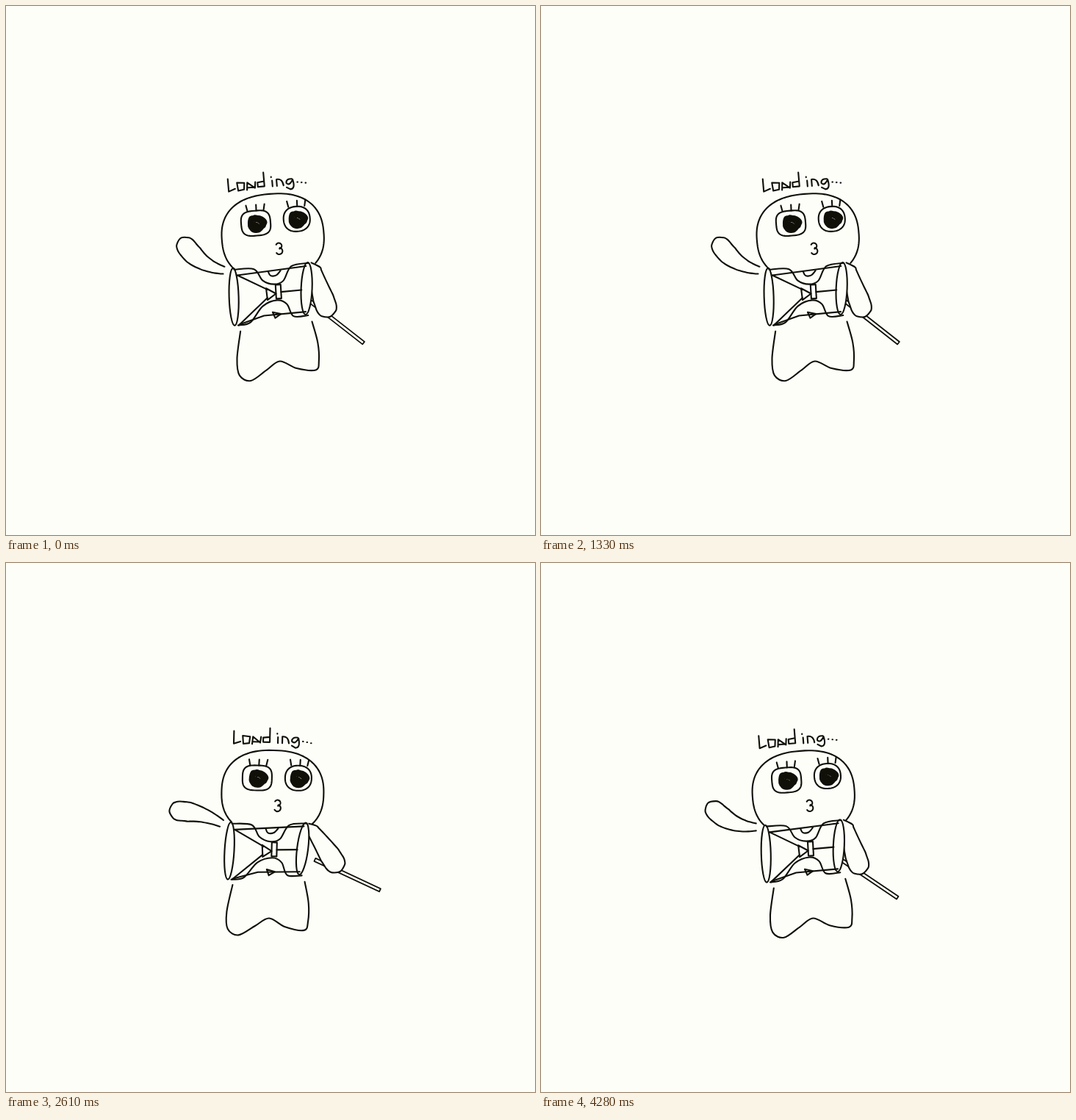
Recreate the animation shown at these times as an HTML page with a canvas. Size 720x720 px, loop 4340 ms.

```html
<!DOCTYPE html>
<html lang="en">
<head>
<meta charset="utf-8">
<title>Loading...</title>
<style>
html, body { margin: 0; width: 100%; height: 100%; overflow: hidden; background: #fefef9; }
canvas { display: block; }
</style>
</head>
<body>
<canvas id="stage" width="720" height="720"></canvas>
<script>
const ctx = document.getElementById('stage').getContext('2d');
const PAPER = '#fefef9', INK = '#101008';
const LOOP = 4340, STEP = 1000 / 18, LAST = 77, RAD = Math.PI / 180;

// Angles in degrees; "left" and "right" aim the hands, "curl" bends the left elbow
const down = { lean: -4, slide: 2, left: 217, curl: -26, right: 72, wand: 38 };
const rest = { lean: -3.7, slide: -4, left: 207, curl: -27, right: 72, wand: 34 };
const low = { lean: 2.6, slide: 3, left: 197, curl: -10, right: 70, wand: 54 };
const drop = { lean: 1.8, slide: 0, left: 193, curl: 16, right: 56, wand: 25 };
const lift = { lean: 0, slide: 0, left: 192, curl: -6, right: 37, wand: 35 };
const fall = { lean: -1.5, slide: -3, left: 145, curl: 24, right: 35, wand: 22 };
const up = { lean: 3, slide: -1, left: 160, curl: -25, right: -17, wand: -76 };

const keys = [
  [0, down], [560, up], [890, fall], [1330, down], [1780, low], [2230, up],
  [2610, drop], [2920, down], [3220, lift], [3610, up], [3930, low], [4280, rest]
];

// Smooth slope through a key, flat at turning points
function slope(k, name) {
  if (!keys[k - 1] || !keys[k + 1]) return 0;
  const rate = i => (keys[i + 1][1][name] - keys[i][1][name]) / (keys[i + 1][0] - keys[i][0]);
  const a = rate(k - 1), b = rate(k);
  return a * b > 0 ? 2 * a * b / (a + b) : 0;
}

function poseAt(t) {
  const k = keys.findIndex((key, i) => i === keys.length - 2 || t < keys[i + 1][0]);
  const [[t0, a], [t1, b]] = keys.slice(k);
  const h = t1 - t0, u = Math.min(1, (t - t0) / h), v = 1 - u;
  const pose = {};
  for (const name in a) {
    pose[name] = v * v * (1 + 2 * u) * a[name] + u * u * (3 - 2 * u) * b[name] +
      h * u * v * (v * slope(k, name) - u * slope(k + 1, name));
  }
  return pose;
}

function line(...p) {
  ctx.beginPath();
  for (let i = 0; i < p.length; i += 2) ctx.lineTo(p[i], p[i + 1]);
  ctx.stroke();
}

// Smooth open curve through the points
function curve(p, fill) {
  const at = i => p[Math.max(0, Math.min(p.length - 1, i))];
  ctx.beginPath();
  ctx.moveTo(...p[0]);
  for (let i = 0; i < p.length - 1; i++) {
    const [a, b, c, d] = [at(i - 1), at(i), at(i + 1), at(i + 2)];
    ctx.bezierCurveTo(b[0] + (c[0] - a[0]) / 6, b[1] + (c[1] - a[1]) / 6,
      c[0] - (d[0] - b[0]) / 6, c[1] - (d[1] - b[1]) / 6, c[0], c[1]);
  }
  if (fill) ctx.fill();
  ctx.stroke();
}

function squircle(x, y, rx, ry, n, from = 0, to = 2 * Math.PI) {
  const bend = v => Math.sign(v) * Math.abs(v) ** (2 / n);
  ctx.beginPath();
  for (let i = 0; i <= 80; i++) {
    const a = from + (to - from) * i / 80;
    ctx.lineTo(x + rx * bend(Math.cos(a)), y + ry * bend(Math.sin(a)));
  }
  ctx.stroke();
}

function oval(x, y, rx, ry, tilt) {
  ctx.beginPath();
  ctx.ellipse(x, y, rx, ry, tilt, 0, 2 * Math.PI);
  ctx.fill();
  ctx.stroke();
}

// Runs draw with the part moved by (dx, dy) and turned about (x, y)
function part(x, y, dx, dy, turn, draw) {
  ctx.save();
  ctx.translate(x + dx, y + dy);
  ctx.rotate(turn * RAD);
  ctx.translate(-x, -y);
  draw();
  ctx.restore();
}

function polar([x, y], angle, len) {
  return [x + len * Math.cos(angle * RAD), y + len * Math.sin(angle * RAD)];
}

function drawLegs() {
  curve([[312, 438], [305, 475], [307, 498], [322, 506], [344, 493], [363, 482],
    [385, 493], [411, 497], [416, 485], [416, 460], [410, 431]]);
}

// Hand lettering, one path per letter
function drawWord() {
  const letters = [
    'M308 229V246L317 243', 'M320 235L321 246L329 245L330 236Z',
    'M333 246L334 236L344 244L345 236M343 243H335', 'M357 224V243H348V237L357 236',
    'M368 236V244M367 231v.5', 'M374 244V235Q382 234 383 244',
    'M395 236Q387 235 387 241Q391 246 396 237Q399 250 392 250L387 247'
  ];
  letters.forEach(d => ctx.stroke(new Path2D(d)));
  for (let i = 0; i < 3; i++) line(402 + 5.5 * i, 241 + i, 402.5 + 5.5 * i, 241 + i);
}

function drawEye(x, y, rx, ry, n) {
  squircle(x, y, rx, ry, n);
  for (const dx of [-10, 2, 12]) line(x + dx, y - ry, x + dx * 1.15, y - ry - 8);
  // Scribbled pupil
  ctx.save();
  ctx.lineWidth = 3;
  const scribble = [];
  for (let i = 0; i < 66; i++) {
    const r = 12.5 * Math.sqrt(i / 66) + 1.2 * Math.sin(i * 2.3), a = i * .72;
    scribble.push([x + 1 + r * Math.cos(a), y + .5 + r * .88 * Math.sin(a)]);
  }
  curve(scribble);
  ctx.restore();
}

function drawHead() {
  squircle(362.5, 312, 69.5, 58, 2.4, Math.PI - .72, 2 * Math.PI + .72);
  drawEye(341, 292, 20, 17, 3.2);
  drawEye(397, 291, 18, 17, 2.3);
  ctx.beginPath();
  ctx.arc(369.5, 325.5, 4, -2.6, 1.4);
  ctx.arc(369.5, 332.5, 4.5, -1.3, 2.6);
  ctx.stroke();
  drawWord();
}

function drawTorso() {
  ctx.beginPath();
  for (const [x, y] of [[306, 354], [345, 362], [410, 352], [402, 421], [306, 430]]) ctx.lineTo(x, y);
  ctx.fill();
  oval(305.5, 391, 6.5, 39, .03);
  oval(405, 385.5, 7.5, 35.5, .1);
  // Collar, neck and hem
  curve([[308, 354], [335, 355], [346, 371], [361, 377], [374, 373], [386, 354], [410, 351]]);
  line(312, 362, 406, 355);
  curve([[354, 359], [357, 365], [365, 365], [371, 359]]);
  curve([[309, 430], [326, 427], [344, 406], [364, 399], [377, 405], [385, 422], [405, 422]]);
  line(311, 429, 345, 419, 402, 417);
  line(357, 415, 368, 418, 360, 423, 357, 415);
  // Bow
  line(312, 362, 352, 384);
  line(310, 430, 351, 395);
  line(350, 382, 363, 390, 351, 398, 350, 382);
  ctx.strokeRect(363, 378, 7, 19);
  line(370, 388, 398, 387);
}

// Outline of a limb around a bent spine, rounded at the hand
function limb(from, bend, hand, w0, w1) {
  const one = [], two = [], N = 16;
  const len = Math.hypot(hand[0] - from[0], hand[1] - from[1]);
  for (let i = 0; i <= N; i++) {
    const u = i / N, v = 1 - u;
    const [x, y] = [0, 1].map(j => v * v * from[j] + 2 * u * v * bend[j] + u * u * hand[j]);
    const [dx, dy] = [0, 1].map(j => v * (bend[j] - from[j]) + u * (hand[j] - bend[j]));
    const cap = Math.max(0, 1 - v * len / 14);
    const w = (w0 + (w1 - w0) * Math.min(1, u * 1.6)) * Math.sqrt(1 - cap * cap) / Math.hypot(dx, dy);
    one.push([x - dy * w, y + dx * w]);
    two.unshift([x + dy * w, y - dx * w]);
  }
  return one.concat(two.slice(1));
}

function drawWand([x, y], angle, reach) {
  ctx.save();
  ctx.translate(x, y);
  ctx.rotate(angle * RAD);
  ctx.lineWidth = 1.8;
  ctx.beginPath();
  ctx.rect(-38, -2.2, reach + 38, 4.4);
  ctx.fill();
  ctx.stroke();
  ctx.restore();
}

function draw(t) {
  const { lean, slide, left, curl, right, wand } = poseAt(t);
  const raise = (72 - right) / 89;
  const torso = { dx: .6 * slide - .8 * lean, dy: 2, turn: .85 * lean };

  // Shoulders follow the torso
  const shoulder = (x, y) => {
    const c = Math.cos(torso.turn * RAD), s = Math.sin(torso.turn * RAD);
    return [354.5 + torso.dx + x * c - y * s, 388.5 + torso.dy + x * s + y * c];
  };

  ctx.fillStyle = PAPER;
  ctx.fillRect(0, 0, 720, 720);
  ctx.fillStyle = PAPER;
  ctx.strokeStyle = INK;
  ctx.lineWidth = 2.1;
  ctx.lineCap = ctx.lineJoin = 'round';

  part(362, 482, .3 * slide - 2.3 * lean - 4 * raise, 1.5, .9 * lean, drawLegs);
  part(370, 328, slide, 1 + 4 * raise * raise, lean - .9 + 2.7 * raise, drawHead);

  const a = shoulder(-60.5, -34.5);
  curve(limb(a, polar(a, left + curl, 40), polar(a, left, 73), 5, 13), true);

  const b = shoulder(62.5, -29.5);
  const elbow = polar(b, 7 + 68 * Math.exp(-12 * raise * raise), 32);
  const hand = polar(b, right, 69);
  drawWand(hand, wand, 58 + 10 * raise);
  curve([...limb(b, elbow, hand, 8, 14), [b[0] - 4, b[1] - 8]], true);

  part(354.5, 388.5, torso.dx, torso.dy, torso.turn, drawTorso);
}

function tick() {
  const t = performance.now() % LOOP;
  draw(Math.min(LAST, Math.floor((t + 6) / STEP)) * STEP);
  requestAnimationFrame(tick);
}
tick();
</script>
</body>
</html>
```
